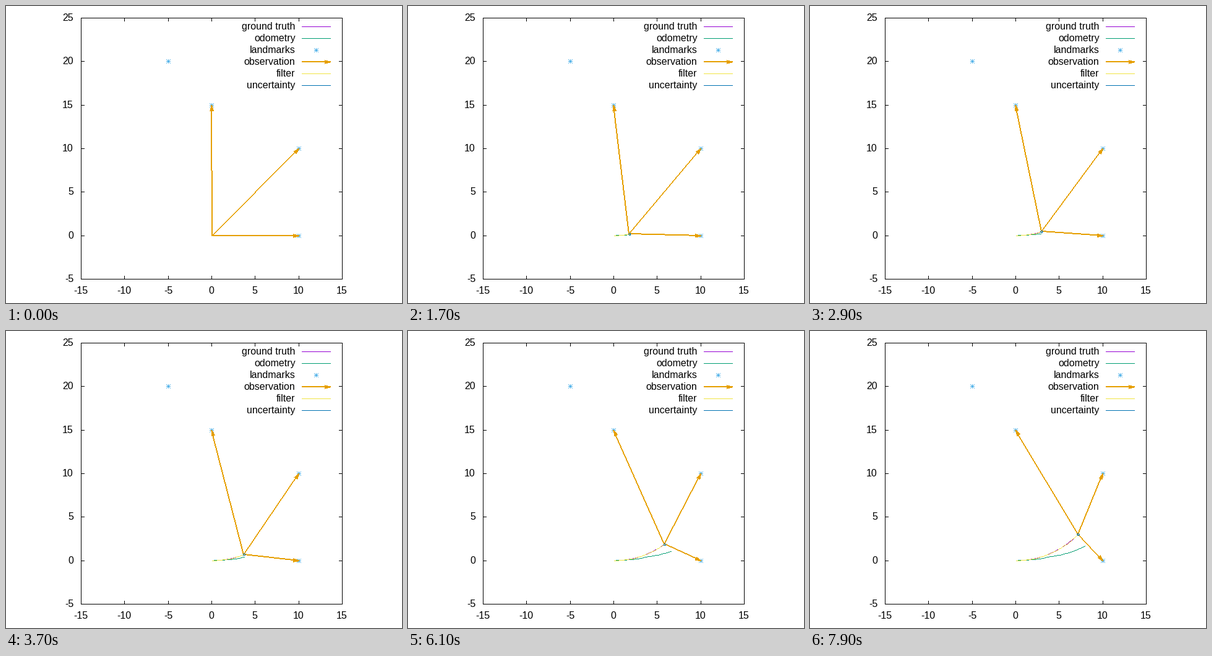
Animation of 640 by 480 pixels, one loop 8 s. Source, as a matplotlib script:

```python
import numpy as np
import matplotlib.pyplot as plt
from matplotlib.animation import FuncAnimation
from matplotlib.collections import PolyCollection

W, H, DPI = 640, 480, 100
FRAMES, STEP = 80, 0.1

PURPLE, TEAL, SKY = "#9400d3", "#009e73", "#56b4e9"
ORANGE, YELLOW, BLUE = "#e69f00", "#f0e442", "#0072b2"
LEFT, RIGHT, TOP, BOTTOM = 121, 543, 19, 441
SCALE = (RIGHT - LEFT) / 30
LANDMARKS = [(10, 0), (10, 10), (0, 15), (-5, 20)]
CELL = np.array([(-0.5, -0.5), (0.5, -0.5), (0.5, 0.5), (-0.5, 0.5)])

plt.rcParams["font.family"] = "Liberation Sans"
fig = plt.figure(figsize=(W / DPI, H / DPI), dpi=DPI, facecolor="white")
ax = fig.add_axes([0, 0, 1, 1])
ax.set_xlim(-0.5, W - 0.5)
ax.set_ylim(H - 0.5, -0.5)
ax.axis("off")


def to_px(x, y):
    px = LEFT + (np.asarray(x) + 15) * SCALE
    py = BOTTOM - (np.asarray(y) + 5) * SCALE
    return np.stack([px, py], axis=-1)


def snap(p):
    return np.floor(np.asarray(p, float) + 0.5)


def segment(a, b, width=1):
    """Pixels of a hard-edged line, thickened across its minor axis."""
    a, b = snap(a), snap(b)
    d = np.abs(b - a)
    pts = snap(np.linspace(a, b, int(d.max()) + 1))
    side = np.array([0, 1]) if d[0] >= d[1] else np.array([1, 0])
    return np.vstack([pts - k * side for k in range(width)])


def polyline(pts):
    if len(pts) == 1:
        return snap(pts)
    return np.vstack([segment(a, b) for a, b in zip(pts[:-1], pts[1:])])


def arrow(start, tip):
    start, tip = snap(start), snap(tip)
    u = (tip - start) / np.hypot(*(tip - start))
    grid = np.mgrid[-11:12, -11:12].reshape(2, -1).T
    back = -grid @ u
    across = np.abs(grid @ np.array([-u[1], u[0]]))
    head = (back >= -0.5) & (back <= 9.5) & (across <= 0.27 * back + 0.8)
    return np.vstack([segment(start, tip, 2), tip + grid[head]])


def star(center, r=3):
    c = snap(center)
    rays = [np.array(v) for v in ((r, 0), (0, r), (r, r), (r, -r))]
    return np.vstack([segment(c - v, c + v) for v in rays])


def ring(center, rx, ry):
    a = np.linspace(0, 2 * np.pi, 17)
    return polyline(center + np.stack([rx * np.cos(a), ry * np.sin(a)], axis=-1))


def cells(pts):
    return np.unique(pts, axis=0)[:, None, :] + CELL


def ink(color, z, pts=None):
    art = PolyCollection([] if pts is None else cells(pts), facecolors=color,
                         edgecolors="none", linewidths=0, zorder=z)
    art.set_snap(False)
    ax.add_collection(art, autolim=False)
    return art


def label(x, y, text, align):
    ax.text(x, y + 4.5, text, fontsize=16 * 72 / DPI, ha=align, va="baseline")


def draw_frame():
    corners = [(LEFT, TOP), (RIGHT, TOP), (RIGHT, BOTTOM), (LEFT, BOTTOM), (LEFT, TOP)]
    parts = [polyline(corners)]
    for k in range(7):
        x, y = snap((LEFT + 5 * k * SCALE, BOTTOM - 5 * k * SCALE))
        parts += [segment((x, TOP), (x, TOP + 5)), segment((x, BOTTOM - 5), (x, BOTTOM)),
                  segment((LEFT, y), (LEFT + 5, y)), segment((RIGHT - 5, y), (RIGHT, y))]
        label(x - 0.5, 460, str(5 * k - 15), "center")
        label(108.5, y, str(5 * k - 5), "right")
    ink("black", 8, np.vstack(parts))


def draw_legend():
    rows = [("ground truth", PURPLE), ("odometry", TEAL), ("landmarks", SKY),
            ("observation", ORANGE), ("filter", YELLOW), ("uncertainty", BLUE)]
    for k, (name, color) in enumerate(rows):
        y = 33 + 19 * k
        label(467, y, name, "right")
        a, b = (478, y), (524, y)
        if name == "landmarks":
            shape = star((501, y))
        elif name == "observation":
            shape = arrow(a, b)
        else:
            shape = segment(a, b)
        ink(color, 1, shape)


# circular drive at 1 m/s and 0.1 rad/s
t = STEP * np.arange(1, FRAMES + 1)
true_x, true_y = 10 * np.sin(t / 10), 10 * (1 - np.cos(t / 10))
truth = to_px(true_x, true_y)

# drifting dead reckoning
knots = [0, 1.8, 3.0, 3.8, 5.0, 6.2, 8.0]
odom = to_px(np.interp(t, knots, [0, 1.9, 2.9, 3.78, 5.25, 6.6, 7.95]),
             np.interp(t, knots, [0, 0.10, 0.22, 0.42, 0.67, 1.05, 1.65]))

# estimate wanders closely around the true path
grow = np.minimum(1, t / 2)
est = to_px(true_x + grow * (0.04 + 0.04 * np.sin(2.9 * t + 1.2)),
            true_y + grow * 0.02 * np.sin(4.3 * t + 2))

draw_frame()
draw_legend()
marks = [to_px(*m) for m in LANDMARKS]
ink(SKY, 4, np.vstack([star(m) for m in marks]))

paths = [(ink(PURPLE, 2), truth), (ink(TEAL, 3), odom), (ink(YELLOW, 6), est)]
sight = ink(ORANGE, 5)
spread = ink(BLUE, 7)


def update(i):
    for art, pts in paths:
        art.set_verts(cells(polyline(pts[:i + 1])))
    sight.set_verts(cells(np.vstack([arrow(truth[i], m) for m in marks[:3]])))
    r = min(1.7, 0.15 * i)
    spread.set_verts(cells(ring(est[i], r, 0.9 * r)))
    spread.set_visible(i > 1)
    return []


anim = FuncAnimation(fig, update, frames=FRAMES, interval=100,
                     repeat=True, repeat_delay=0, blit=False)
plt.show()
```
